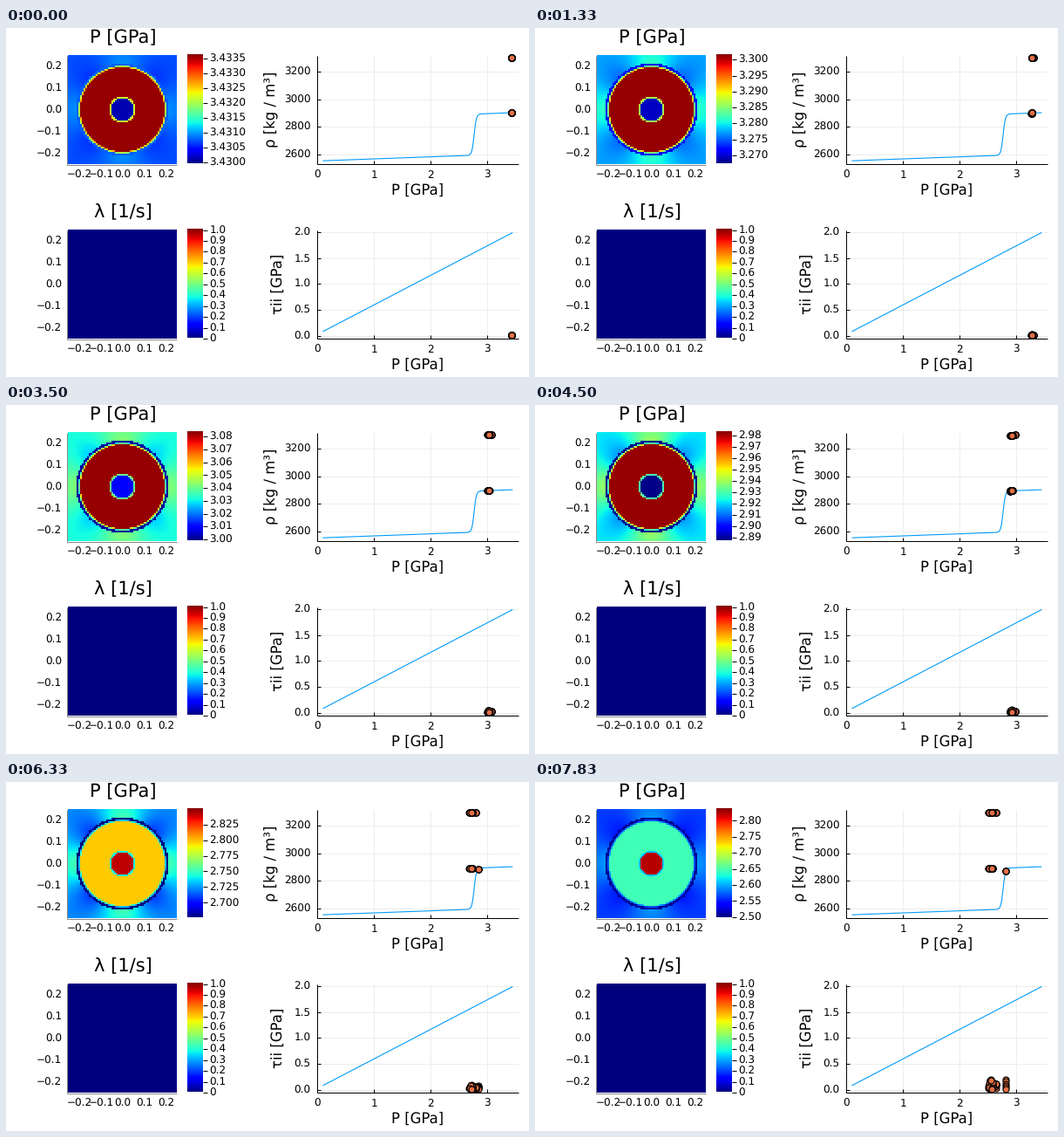
A matplotlib script that plays this animation: 600x400 px, repeating every 8000 ms.

```python
import math

import numpy as np
import matplotlib.pyplot as plt
from matplotlib.animation import FuncAnimation

W, H, DPI = 600, 400, 100
LOOP, STEPS = 8000, 48             # ms, simulation steps per loop
INTERVAL = 50                      # ms per drawn frame
PT = 72 / DPI                      # points per pixel
BLUE, ORANGE = "#009afa", "#e26f46"
KEYS = [0, 8, 13, 21, 32, 38, 47]  # steps at which the physics is pinned

plt.rcParams["font.family"] = "DejaVu Sans"
plt.rcParams["text.hinting"] = "none"
fig = plt.figure(figsize=(W / DPI, H / DPI), dpi=DPI, facecolor="white")
ax = fig.add_axes([0, 0, 1, 1])
ax.set_xlim(0, W)
ax.set_ylim(H, 0)
ax.axis("off")


# ---------- drawing helpers (pixel coordinates) ----------
def line(xs, ys, color="black", lw=1.0, z=3):
    return ax.plot(xs, ys, color=color, lw=lw * PT, zorder=z,
                   solid_capstyle="butt")[0]


def on_row(y):
    """Place y so that snapping fills the pixel row holding it."""
    return math.floor(y) + 0.8


def rule(x0, y0, x1, y1, color="black", z=3):
    xs = [math.floor(x) + 0.2 for x in (x0, x1)]
    return line(xs, [on_row(y0), on_row(y1)], color, 1.0, z)


def label(x, y, s, size=12, ha="center", rot=0):
    """Text centred on y by its digit height, or upright along x."""
    shift = (0.365 if size == 12 else 0.315) * size
    dx, dy = (shift, 0) if rot else (0, shift)
    return ax.text(x + dx, y + dy, s, fontsize=size * PT, ha=ha, va="baseline",
                   rotation=rot, rotation_mode="anchor", zorder=6)


def picture(data, box):
    left, right, top, bottom = box
    im = ax.imshow(data, extent=(left, right, bottom, top), cmap="jet",
                   vmin=0, vmax=1, aspect="auto", interpolation="nearest",
                   zorder=2)
    ax.set_xlim(0, W)
    ax.set_ylim(H, 0)
    return im


def minus(v, digits):
    return f"{v:.{digits}f}".replace("-", "\u2212")


# ---------- left column: heatmaps and colour bars ----------
BAR_TOP, BAR_H = 31, 124.5


def map_panel(top, title, data):
    label(134, top - 20, title, 21)
    for i in range(-2, 3):
        text = minus(i / 10, 1)
        label(134 + 25 * i, top + 136.5, text)
        label(64, top + 62.3 - 25 * i, text, ha="right")
    rule(70, top, 70, top + 125, "#888888", 1)
    rule(70, top + 125, 196, top + 125, "#888888", 1)
    ramp = np.linspace(1, 0, 256)[:, None]
    picture(ramp, (208, 226, top, top + BAR_H))
    return picture(data, (71, 196, top, top + 125))


N = 62
CELL = 0.5 / N
axis = (np.arange(N) + 0.5) * CELL - 0.25
gx, gy = np.meshgrid(axis, axis)
rad = np.hypot(gx, gy)
ang = np.arctan2(gy, gx)
R_OUT, R_IN = 0.2, 0.05

heat = map_panel(31, "P [GPa]", np.zeros((N, N)))
map_panel(231, "\u03bb [1/s]", np.zeros((2, 2)))
for i in range(11):
    y = 231 + BAR_H * (1 - i / 10)
    rule(226, y, 231, y)
    label(233.5, y, "0" if i == 0 else f"{i / 10:.1f}", ha="left")

bar_ticks = [(rule(226, 0, 231, 0), label(233.5, 0, "", ha="left"))
             for _ in range(12)]


# ---------- right column: curves ----------
def px(p):
    return 357 + 65 * np.asarray(p)


def py_rho(d):
    return 144.3 - 0.1573 * (np.asarray(d) - 2600)


def py_tau(t):
    return 352 - 59.1 * np.asarray(t)


def curve_panel(top, ylabel, ylabel_x, ticks, to_y, digits):
    low = top + 124.5
    for p in range(4):
        x = float(px(p))
        rule(x, top, x, low, "#ededed", 1)
        rule(x, low, x, low - 4)
        label(x + 0.3, top + 136.5, str(p))
    for v in ticks:
        y = float(to_y(v))
        rule(357, y, 588, y, "#ededed", 1)
        rule(357, y, 361, y)
        label(349.5, y, f"{v:.{digits}f}", ha="right")
    rule(357, top, 357, low)
    rule(357, low, 588, low)
    label(472.5, top + 155.5, "P [GPa]", 16.5)
    label(ylabel_x, top + 62, ylabel, 16.5, rot=90)


def rho_high(p):
    return 2900 + 15 * (p - 3.44)


def rho_curve(p):
    jump = 0.5 * (1 + np.tanh((p - 2.77) / 0.04))
    return rho_high(p) - 300 * (1 - jump)


curve_panel(31, "\u03c1 [kg / m\u00b3]", 304, range(2600, 3201, 200), py_rho, 0)
curve_panel(231, "\u03c4ii [GPa]", 313, np.arange(5) / 2, py_tau, 1)
p_axis = np.linspace(0.1, 3.45, 400)
line(px(p_axis), py_rho(rho_curve(p_axis)), BLUE, 1.1, 4)
line(px(p_axis), py_tau(0.0115 + 0.573 * p_axis), BLUE, 1.1, 4)


def dots():
    return ax.plot([], [], "o", ms=7 * PT, mfc=ORANGE, mec="black",
                   mew=1.1 * PT, zorder=5)[0]


upper, lower, stress = dots(), dots(), dots()


# ---------- physics ----------
def keyed(k, values):
    return float(np.interp(k, KEYS, values))


def state(k):
    lo = keyed(k, [3.42994, 3.2672, 3.1644, 2.9986, 2.7932, 2.6756, 2.497])
    ring = float(np.interp(k, [0, 8, 32, 47],
                           [3.43359, 3.3013, 2.8989, 2.6487]))
    hi = max(ring, 2.8487 - 0.0015 * (k - 38))
    falling = 3.4301 - 0.0201 * k
    held = 2.839 - 0.0022 * (k - 38)      # the core buffers at its transition
    core = 0.004 * np.logaddexp(falling / 0.004, held / 0.004)
    return lo, hi, ring - 0.02 * (hi - lo), core


def background(k):
    level = keyed(k, [0.22, 0.32, 0.37, 0.42, 0.39, 0.31, 0.21])
    swing = keyed(k, [0.05, 0.10, 0.11, 0.10, 0.18, 0.14, 0.07])
    edge = keyed(k, [0.22, 0.10, 0.06, 0.03, 0.0, 0.0, 0.02])
    return level, swing, edge


lobes = (R_OUT / np.maximum(rad, R_OUT)) ** 2 * np.cos(4 * ang)


def field(k, ring, core):
    level, swing, edge = background(k)
    f = level + swing * lobes
    f[rad < R_OUT + 1.4 * CELL] = edge
    depth = np.clip((R_OUT - rad) / CELL, 0, 1)
    rim = edge + (0.35 + 0.4 * depth) * (ring - edge)
    f = np.where(rad < R_OUT, rim, f)
    f[rad < R_OUT - 0.9 * CELL] = ring
    seam = 0.6 - 0.27 * k / 47 + 0.1 * (rad - R_IN) / CELL - 0.05
    f = np.where(rad < R_IN + CELL, seam, f)
    f[rad < R_IN] = core
    return f


def nice_ticks(lo, hi):
    decade = math.floor(math.log10(hi - lo)) - 1
    for mant, power in ((m, e) for e in (decade, decade + 1)
                        for m in (1, 2.5, 5)):
        step = mant * 10.0 ** power
        if (hi - lo) / step <= 10:
            break
    first, last = math.ceil(lo / step - 1e-9), math.floor(hi / step + 1e-9)
    digits = -power + (mant == 2.5)
    return [i * step for i in range(first, last + 1)], digits


rng = np.random.default_rng(4)
mix = np.append(rng.random(36), 0.75)       # place between rim and lobe level
lift = np.append(rng.random(36), 0.0)
ring_mix, ring_lift = rng.random(8), rng.random(8)
core_mix = np.linspace(1, 0, 6)


def update(frame):
    # a step shows in every drawn frame that it begins in
    k = int((frame + 0.9) * INTERVAL * STEPS / LOOP)
    lo, hi, ring, core = state(k)
    span = hi - lo
    heat.set_data(field(k, (ring - lo) / span, (core - lo) / span))

    values, digits = nice_ticks(lo, hi)
    for i, (mark, text) in enumerate(bar_ticks):
        shown = i < len(values)
        mark.set_visible(shown)
        text.set_visible(shown)
        if shown:
            y = BAR_TOP + BAR_H * (hi - values[i]) / span
            mark.set_ydata([on_row(y)] * 2)
            text.set_y(y + 0.365 * 12)
            text.set_text(f"{values[i]:.{digits}f}")

    level, swing, edge = background(k)
    top = level + 0.6 * swing
    p_bg = lo + span * (edge + (top - edge) * mix)
    p_ring = ring + 0.015 * span * (2 * ring_mix - 1)
    p_core = core + 0.001 * (core_mix - 0.5)

    p_up = np.concatenate([p_ring, p_bg])
    upper.set_data(px(p_up), py_rho(3300 + 4 * (p_up - 3.44)))
    p_low = np.concatenate([p_core, p_bg])
    rho_low = np.concatenate([rho_curve(p_core), rho_high(p_bg)])
    lower.set_data(px(p_low), py_rho(rho_low))

    peak = keyed(k, [0, 0.01, 0.016, 0.035, 0.055, 0.085, 0.2])
    core_peak = float(np.interp(k, [32, 38, 47], [0, 0.07, 0.18]))
    t_bg = peak * lift * (1 - 0.9 * np.abs(mix - 0.65))
    p_all = np.concatenate([p_core, p_ring, p_bg])
    t_all = np.concatenate([core_peak * core_mix, 0.8 * peak * ring_lift, t_bg])
    stress.set_data(px(p_all), py_tau(t_all))
    return [heat, upper, lower, stress]


anim = FuncAnimation(fig, update, frames=LOOP // INTERVAL, interval=INTERVAL,
                     init_func=lambda: update(0), repeat=True, repeat_delay=0,
                     blit=False)
plt.show()
```
